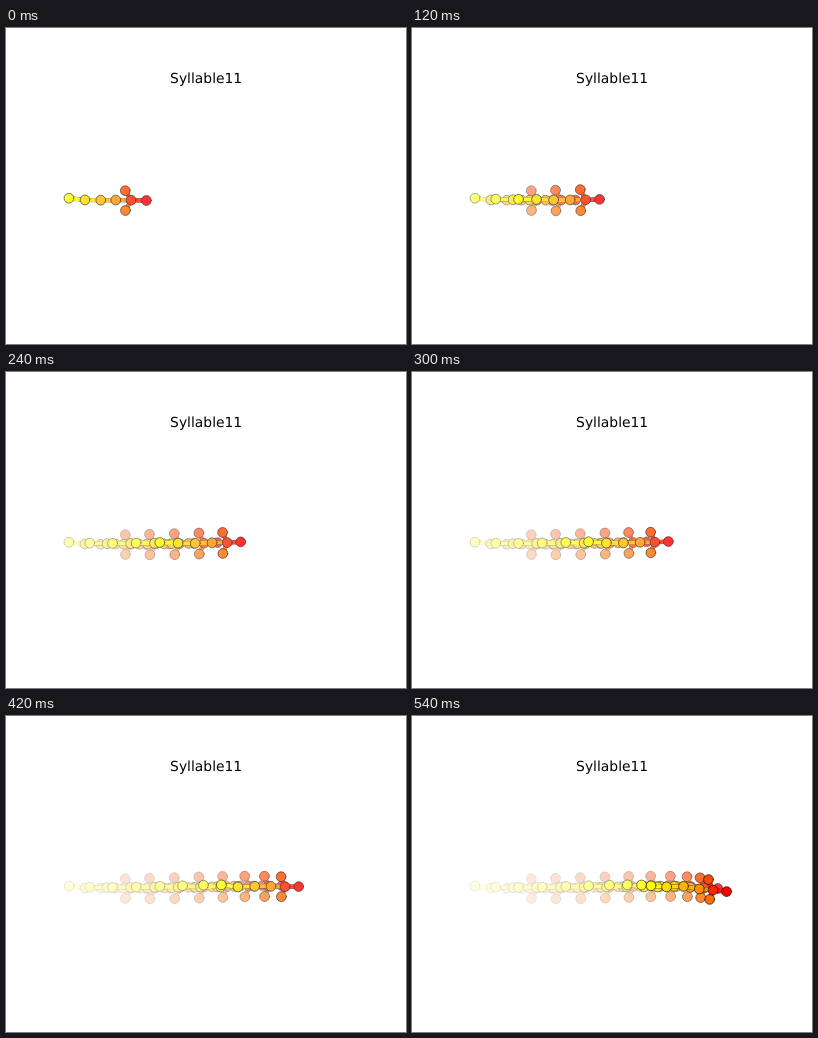
These frames come from a looping animation (400x316 px, 600 ms). An HTML page with a canvas:

```html
<!DOCTYPE html>
<html lang="en">
<head>
<meta charset="utf-8">
<title>Syllable11</title>
<style>
  html, body { margin: 0; width: 400px; height: 316px; overflow: hidden; background: #fff; }
  canvas, svg { position: absolute; left: 0; top: 0; display: block; }
  text { font: 13.89px "DejaVu Sans", sans-serif; text-rendering: geometricPrecision; }
</style>
</head>
<body>
<canvas id="stage" width="400" height="316"></canvas>
<svg width="400" height="316"><text x="164.1" y="55">Syllable11</text></svg>
<script>
const ctx = document.getElementById('stage').getContext('2d');
const STEP = 60, COUNT = 10, FADE = 0.2, RADIUS = 4.9;

// Each joint follows a cubic through four points, evenly spaced in time.
const paths = {
  tail:     [[63, 170.2], [130.2, 171.1], [197.4, 169.2], [239, 169.8]],
  hip:      [[79, 172], [148.5, 171.3], [214.7, 171], [254.6, 170.9]],
  back:     [[94.8, 172.2], [165.7, 171.7], [231.5, 170.6], [271.5, 170.4]],
  shoulder: [[109.8, 172.1], [182.5, 171.4], [248, 170.1], [287.3, 173]],
  leftEar:  [[119.5, 182.5], [193.3, 182.1], [258.6, 180.5], [297.7, 183.4]],
  rightEar: [[119.3, 162.7], [192.9, 161], [258.4, 160.2], [296.5, 163.6]],
  head:     [[125.1, 172.2], [197.9, 171.2], [262.5, 170.2], [301, 174.1]],
  nose:     [[140.4, 172.5], [211.5, 170.6], [276, 169.7], [314.6, 175.6]]
};
const joints = Object.keys(paths);
const edges = [
  ['tail', 'hip'], ['hip', 'back'], ['back', 'shoulder'], ['shoulder', 'head'],
  ['leftEar', 'head'], ['rightEar', 'head'], ['head', 'nose']
];

function color(joint) {
  const share = joints.indexOf(joint) / (joints.length - 1);
  return `rgb(255, ${Math.round(255 * (1 - share))}, 0)`;
}

// Lagrange interpolation through points at u = 0, 1, 2, 3.
function pointOn(path, u) {
  const weights = path.map((_, i) =>
    path.reduce((w, _, j) => j === i ? w : w * (u - j) / (i - j), 1));
  return [0, 1].map(axis => path.reduce((sum, p, i) => sum + weights[i] * p[axis], 0));
}

function poseAt(step) {
  const u = 3 * step / (COUNT - 1);
  return Object.fromEntries(joints.map(joint => [joint, pointOn(paths[joint], u)]));
}

function line(a, b, width, style) {
  ctx.lineWidth = width;
  ctx.strokeStyle = style;
  ctx.beginPath();
  ctx.moveTo(...a);
  ctx.lineTo(...b);
  ctx.stroke();
}

function drawPose(pose) {
  ctx.lineCap = 'square';
  for (const [a, b] of edges) line(pose[a], pose[b], 4.2, '#000');
  for (const [a, b] of edges) line(pose[a], pose[b], 4, color(a));
  ctx.lineWidth = 0.65;
  ctx.strokeStyle = '#000';
  for (const joint of joints) {
    ctx.beginPath();
    ctx.arc(...pose[joint], RADIUS, 0, 2 * Math.PI);
    ctx.fillStyle = color(joint);
    ctx.fill();
    ctx.stroke();
  }
}

function veil(alpha) {
  ctx.fillStyle = `rgba(255, 255, 255, ${alpha})`;
  ctx.fillRect(0, 0, 400, 316);
}

// Each pose is veiled in white, so older ones fade; the final pose stays vivid.
function drawStep(step) {
  veil(1);
  for (let i = 0; i <= step; i++) {
    drawPose(poseAt(i));
    if (i < COUNT - 1) veil(FADE);
  }
}

let shown = -1;
const start = performance.now();
function tick() {
  const step = Math.floor((performance.now() - start) / STEP) % COUNT;
  if (step !== shown) drawStep(shown = step);
  requestAnimationFrame(tick);
}
tick();
</script>
</body>
</html>
```
